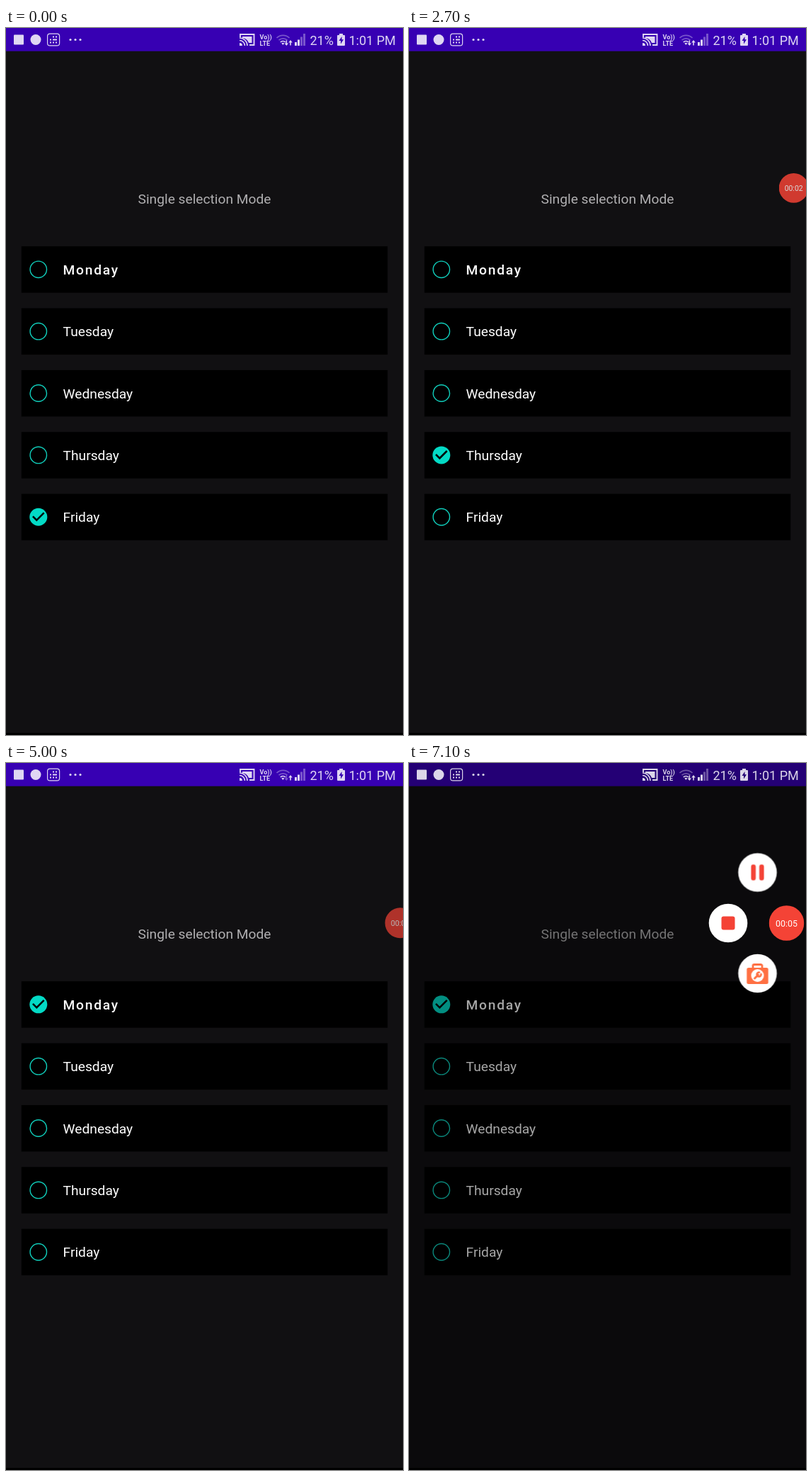
An HTML page that plays this animation: 561x998 px, repeating every 8100 ms.

```html
<!DOCTYPE html>
<html lang="en">
<head>
<meta charset="utf-8">
<title>Single selection list</title>
<style>
  html, body { margin: 0; width: 100%; height: 100%; overflow: hidden; background: #111012; }
  svg { display: block; width: 100%; height: 100%; font-family: Roboto, sans-serif; }
  text { white-space: pre; }

  .label { font-size: 19.2px; fill: #fff; }
  .label.strong { font-weight: 500; letter-spacing: .0892em; }
  .title { font-size: 19.2px; fill: #b0afb1; text-anchor: middle; }
  .ring { fill: none; stroke: #10cfbc; stroke-width: 1.4; }
  .tick { visibility: hidden; }
  .on .tick { visibility: visible; }
  .on .ring { visibility: hidden; }

  .status { fill: #fff; opacity: .84; }
  .line { fill: none; stroke: #fff; }
  .faint { opacity: .4; }
  .clock { font-size: 18px; }
  .volte { font-size: 9px; font-weight: 700; }

  .ball, .dim, .button, .down, .up { animation: 8100ms step-end infinite; }
  .ball { animation-name: ball; }
  .dim { animation-name: dim; }
  .button { animation-name: open; }
  .down { animation-name: down; }
  .up { animation-name: up; }
  .timer { font-size: 12.4px; fill: #fff; text-anchor: middle; }

  @keyframes ball {
    0% { opacity: 0; transform: translate(533.5px, 226px); }
    3.7% { opacity: 1; transform: translate(533.5px, 226px); }
    29.62% { opacity: 1; transform: translate(533.5px, 226px) scale(1); animation-timing-function: steps(4); }
    34.56% { opacity: .8; transform: translate(547px, 225.8px) scale(.79); }
    59.25% { opacity: .7; transform: translate(555px, 225.8px) scale(.79); }
    60.49% { opacity: .6; transform: translate(561px, 225.8px) scale(.79); }
    61.72% { opacity: .7; transform: translate(557px, 225.8px) scale(.865); }
    62.96%, 100% { opacity: 1; transform: translate(533.5px, 226px); }
  }
  @keyframes dim {
    0% { opacity: 0; }
    64.19% { opacity: 0; animation-timing-function: steps(2); }
    66.66%, 100% { opacity: .35; }
  }
  @keyframes open {
    0% { opacity: 0; transform: none; }
    66.66% { opacity: .2; transform: translate(calc(var(--dx) * .15), calc(var(--dy) * .15)); }
    67.9% { opacity: .65; transform: translate(calc(var(--dx) * .6), calc(var(--dy) * .6)); }
    69.13%, 100% { opacity: 1; transform: translate(var(--dx), var(--dy)); }
  }
  @keyframes down { 0% { opacity: 1; } 59.25% { opacity: .4; } 87.65%, 100% { opacity: 1; } }
  @keyframes up { 0% { opacity: 1; } 74.07% { opacity: .4; } 87.65%, 100% { opacity: 1; } }
</style>
</head>
<body>
<svg viewBox="0 0 561 998">
  <rect width="561" height="998" fill="#111012"/>
  <rect width="561" height="32.7" fill="#3700b3"/>
  <text class="title" x="280.5" y="248">Single selection Mode</text>
  <g id="rows"></g>
  <rect y="995" width="561" height="3"/>
  <rect class="dim" width="561" height="998"/>

  <g class="status">
    <rect x="11" y="9.5" width="14" height="14" rx="1"/>
    <circle cx="42" cy="16.5" r="7.5"/>
    <!-- framed dots -->
    <rect class="line" x="58.6" y="8.1" width="17" height="16.8" rx="3.5" stroke-width="1.2"/>
    <path d="M66 11.5h2v2h-2zM70 11.5h2v2h-2zM62 15.5h2v2h-2zM66 15.5h6v2h-6zM62 19.5h2v2h-2zM66 19.5h2v2h-2zM70 19.5h2v2h-2z"/>
    <circle cx="91" cy="16.5" r="1.6"/><circle cx="98" cy="16.5" r="1.6"/><circle cx="105" cy="16.5" r="1.6"/>
    <!-- cast -->
    <path class="line" stroke-width="1.9" d="M331 13V9H350.5V24H344"/>
    <path d="M334 12H347.5V21H343Q341 15 334 14Z"/>
    <path class="line" stroke-width="1.6" d="M330 17.5a7.5 7.5 0 0 1 7.5 7.5M330 14a11 11 0 0 1 11 11"/>
    <path d="M330 21a4 4 0 0 1 4 4h-4z"/>
    <text class="volte" x="358.5" y="15.8">Vo))</text>
    <text class="volte" x="358.5" y="25">LTE</text>
    <!-- wifi -->
    <g class="line" stroke-width="1.7">
      <path class="faint" d="M382.5 14a13 13 0 0 1 18 0"/>
      <path class="faint" d="M385.5 17.2a9 9 0 0 1 12 0"/>
      <path d="M387.8 20a5 5 0 0 1 7 0"/>
    </g>
    <path d="M389.3 21.6a3 3 0 0 1 4 0l-2 2.4z"/>
    <path class="down" d="M395.5 17.5h1.6v4h2l-2.8 3.5-2.8-3.5h2z"/>
    <path class="up" d="M401.2 24.5h1.6v-4h2l-2.8-3.5-2.8 3.5h2z"/>
    <!-- signal -->
    <path d="M408 20h3v5h-3zM412 16.5h3v8.5h-3z"/>
    <path class="faint" d="M416 12.5h3v12.5h-3zM420 8h3v17h-3z"/>
    <text class="clock" x="429.5" y="24">21%</text>
    <!-- battery -->
    <path fill-rule="evenodd" d="M471 8h5v2h2q1 0 1 1v13q0 1-1 1h-9q-1 0-1-1V11q0-1 1-1h2zM474.5 12l-4 6h2.5v4.5l4-6.200h-2.500z"/>
    <text class="clock" x="484.5" y="24">1:01 PM</text>
  </g>

  <g transform="translate(533.5 226)">
    <g class="button" style="--dx:-41px;--dy:-71.5px">
      <circle r="27.3" fill="#fff"/>
      <path d="M-5.800-8V8M5.800-8V8" stroke="#f44336" stroke-width="6.6" stroke-linecap="round"/>
    </g>
    <g class="button" style="--dx:-82.5px;--dy:0px">
      <circle r="27.3" fill="#fff"/>
      <rect x="-9.500" y="-9.500" width="19" height="19" rx="3" fill="#f44336"/>
    </g>
    <g class="button" style="--dx:-41px;--dy:71px">
      <circle r="27.3" fill="#fff"/>
      <rect x="-6.500" y="-12.500" width="13" height="8" rx="2" fill="none" stroke="#ff7043" stroke-width="2.8"/>
      <rect x="-15.200" y="-8" width="30.4" height="23" rx="2.5" fill="#ff7043"/>
      <circle cy="3" r="9" fill="#fff"/>
      <g fill="none" stroke="#ff7043" stroke-linecap="round">
        <path stroke-width="3" d="M-4 7L1 2"/>
        <path stroke-width="2.6" d="M2.500-1.500A3 3 0 1 0 5 1"/>
      </g>
    </g>
  </g>
  <g class="ball">
    <circle r="24.8" fill="#f44336"/>
    <text class="timer" id="timer" y="4.5">00:00</text>
  </g>
</svg>
<script>
  const LOOP = 8100;
  const days = ["Monday", "Tuesday", "Wednesday", "Thursday", "Friday"];
  // [start in ms, chosen row]
  const picks = [[0, 4], [1000, 0], [1500, 1], [1900, 2], [2300, 3], [2800, 4],
                 [3200, 3], [3500, 2], [3900, 1], [4200, 0]];

  const list = document.getElementById("rows");
  const timer = document.getElementById("timer");

  list.innerHTML = days.map((day, i) => `
    <g transform="translate(0 ${308.2 + i * 87.36})">
      <rect x="21.8" width="517.4" height="65.5"/>
      <circle class="ring" cx="45.8" cy="32.6" r="11.7"/>
      <g class="tick" transform="translate(45.8 32.6) scale(1.25) translate(-12 -12)">
        <circle cx="12" cy="12" r="10" fill="#03dac5"/>
        <path d="M10 17l-5-5 1.410-1.410L10 14.170l7.590-7.590L19 8z"/>
      </g>
      <text class="label${i ? "" : " strong"}" x="80.600" y="39.700">${day}</text>
    </g>`).join("");

  function draw(t) {
    const chosen = picks.filter(([start]) => start <= t).pop()[1];
    [...list.children].forEach((row, i) => row.classList.toggle("on", i === chosen));
    const seconds = Math.max(0, Math.min(5, Math.floor((t - 200) / 1000)));
    timer.textContent = "00:0" + seconds;
  }

  let origin;
  function tick(now) {
    origin ??= now;
    draw((now - origin) % LOOP);
    requestAnimationFrame(tick);
  }
  draw(0);
  requestAnimationFrame(tick);
</script>
</body>
</html>
```
